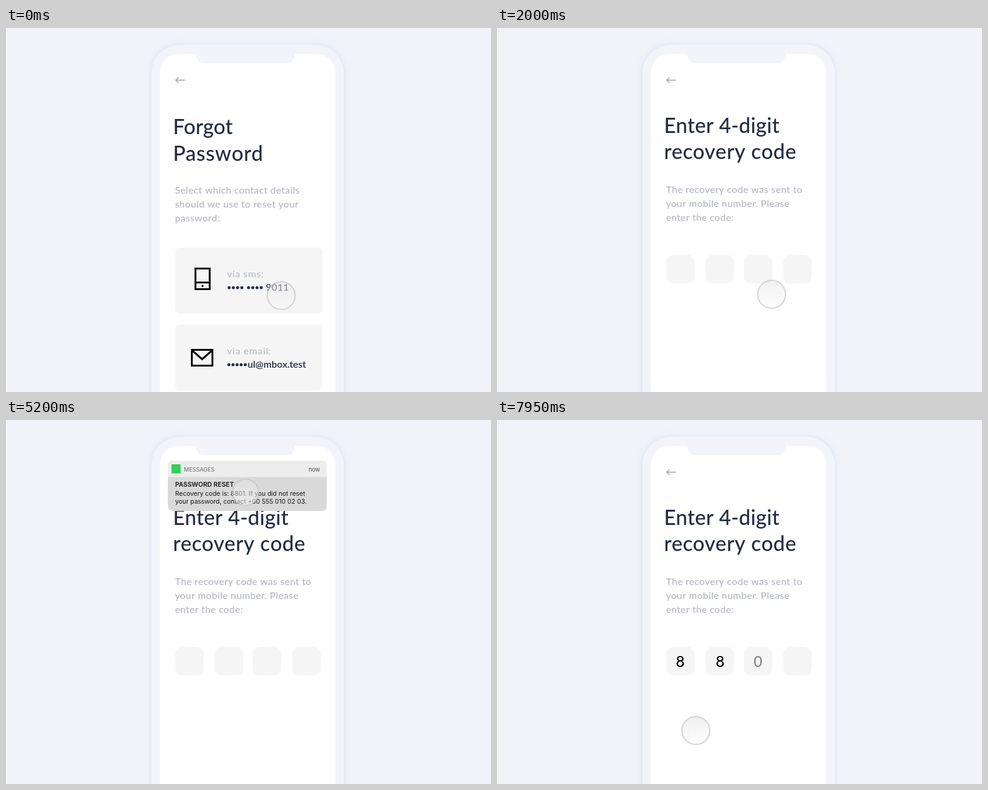
Write an HTML page with a canvas that moves like this. It is 800x600 px and loops after 8000 ms.

```html
<!DOCTYPE html>
<html lang="en">
<head>
<meta charset="utf-8">
<title>Password recovery</title>
<style>
  html, body { margin: 0; width: 100%; height: 100%; overflow: hidden; background: #f1f3f8; }
  canvas { display: block; }
</style>
</head>
<body>
<canvas id="stage" width="800" height="600"></canvas>
<script>
const ctx = document.getElementById('stage').getContext('2d');
const LOOP = 8000, STEP = 50;
const LATO = 'Lato, sans-serif', INTER = 'Inter, sans-serif';
const INK = '#232c42', MUTED = '#b3b6c1', SHELL = '#f3f4fa', TILE = '#f5f5f5';
const REST = [454, 441], IDLE = [453, 439], BANNER = [395, 119], FIELD = [318, 388], KEYS = [328, 512];

const ramp = (t, a, b) => Math.min(1, Math.max(0, (t - a) / (b - a)));
const smooth = u => u * u * (3 - 2 * u);
const mix = (p, q, u) => p.map((v, i) => v + (q[i] - v) * u);

function box(x, y, w, h, r, fill) {
  ctx.beginPath();
  ctx.roundRect(x, y, w, h, r);
  ctx.fillStyle = fill;
  ctx.fill();
}

function text(str, x, y, font, color, spacing = 0, align = 'left') {
  ctx.font = font;
  ctx.fillStyle = color;
  ctx.letterSpacing = spacing + 'px';
  ctx.textAlign = align;
  ctx.fillText(str, x, y);
}

function line(points, width, color) {
  ctx.beginPath();
  points.forEach(([x, y]) => ctx.lineTo(x, y));
  ctx.lineWidth = width;
  ctx.strokeStyle = color;
  ctx.stroke();
}

function disc(x, y, r, fill) {
  ctx.beginPath();
  ctx.arc(x, y, r, 0, Math.PI * 2);
  ctx.fillStyle = fill;
  ctx.fill();
}

function layer(alpha, dx, dy, draw) {
  if (alpha <= 0) return;
  ctx.save();
  ctx.globalAlpha = alpha;
  ctx.translate(dx, dy);
  draw();
  ctx.restore();
}

const title = (str, y, spacing) => text(str, 275.5, y, `500 34px ${LATO}`, INK, spacing);
const note = (lines, y) =>
  lines.forEach((s, i) => text(s, 278.7, y + i * 23, `500 16px ${LATO}`, MUTED, 0.36));

function dots(x, y, n, gap) {
  for (let i = 0; i < n; i++) disc(x + i * gap, y, 2.5, INK);
}

function phone() {
  ctx.fillStyle = '#f1f3f8';
  ctx.fillRect(0, 0, 800, 600);
  ctx.fillStyle = '#fafbfd';
  ctx.fillRect(0, 0, 1, 600);
  ctx.save();
  ctx.shadowColor = 'rgba(176, 196, 226, 0.42)';
  ctx.shadowBlur = 12;
  box(240, 28, 317, 700, 46, SHELL);
  ctx.restore();
  box(254, 43, 289, 700, 30, '#fff');
  box(314, 42, 162, 16, [0, 0, 13, 13], SHELL);
  const grey = '#a6a8b2';
  line([[280, 86], [295, 86]], 1.6, grey);
  line([[284.5, 81.5], [280, 86], [284.5, 90.5]], 1.6, grey);
}

function choicePage() {
  title('Forgot', 175, 0.1);
  title('Password', 218.5, 0.7);
  note(['Select which contact details', 'should we use to reset your', 'password:'], 272.5);

  box(279, 362, 243, 109, 8, TILE);
  box(279, 489, 242, 109, 8, TILE);
  const label = `500 16px ${LATO}`;
  text('via sms:', 364.5, 411, label, '#b9bbc4', 0.7);
  text('via email:', 364.5, 538, label, '#b9bbc4', 0.8);
  dots(368, 428, 4, 7);
  dots(400, 428, 4, 7);
  text('9011', 428.5, 433, label, INK, 0.3);
  dots(367.7, 555, 5, 6.7);
  text('ul@mbox.test', 398.5, 560, `600 16px ${LATO}`, INK);

  ctx.lineWidth = 3;
  ctx.strokeStyle = '#000';
  ctx.strokeRect(312.5, 396.5, 23.5, 34);
  line([[312, 419.5], [336, 419.5]], 3, '#000');
  disc(324.2, 425.3, 1.7, '#000');
  ctx.strokeRect(306.5, 530.5, 34, 26);
  line([[307, 531.5], [323.5, 546], [340, 531.5]], 3, '#000');
}

function codePage(t) {
  title('Enter 4-digit', 173, 0.25);
  title('recovery code', 216, 0.6);
  note(['The recovery code was sent to', 'your mobile number. Please', 'enter the code:'], 271.5);
  [279, 344, 407, 472].forEach(x => box(x, 374, 47, 47, 12, TILE));
  [...'880'].forEach((digit, i) => {
    const start = 7350 + i * 250;
    layer(ramp(t, start, start + 220), 0, 0, () =>
      text(digit, [302.3, 368, 430.5][i], 407, `500 25px ${LATO}`, '#000', 0, 'center'));
  });
}

function banner() {
  box(267, 67, 262, 83, 8, '#d9d9d9');
  box(267, 67, 262, 27, [8, 8, 0, 0], '#ededed');
  ctx.fillStyle = '#2fd158';
  ctx.fillRect(273, 73, 15, 15);
  text('MESSAGES', 293.5, 84.5, `400 9.3px ${INTER}`, '#6c6c6c');
  text('now', 518, 84.5, `400 9.5px ${INTER}`, '#4a4a4a', 0, 'right');
  text('PASSWORD RESET', 279, 110, `600 10.6px ${INTER}`, '#161616');
  text('Recovery code is: 8801. If you did not reset', 279, 124.5, `400 10.5px ${INTER}`, '#161616');
  text('your password, contact +00 555 010 02 03.', 279, 137.5, `400 10.5px ${INTER}`, '#161616');
}

function pointerAt(t) {
  if (t < 3670) return mix(REST, IDLE, ramp(t, 0, 100));
  if (t < 5300) return mix(IDLE, BANNER, smooth(ramp(t, 3670, 4650)));
  if (t < 7250) return mix(BANNER, FIELD, smooth(ramp(t, 5300, 6700) ** 0.55));
  const u = smooth(ramp(t, 7250, 7960)), bend = [305, 450];
  return mix(mix(FIELD, bend, u), mix(bend, KEYS, u), u);
}

function pointer(t) {
  const [x, y] = pointerAt(t);
  const pressed = [[600, 650], [5200, 5350], [7000, 7150]].some(([a, b]) => t >= a && t < b);
  const r = pressed ? 21.5 : 23;
  const fill = ctx.createLinearGradient(0, y - r, 0, y + r);
  fill.addColorStop(0, 'rgba(226, 226, 226, 0.5)');
  fill.addColorStop(1, 'rgba(252, 252, 252, 0.5)');
  disc(x, y, r, fill);
  ctx.lineWidth = 2.2;
  ctx.strokeStyle = 'rgba(196, 196, 196, 0.65)';
  ctx.stroke();
}

function draw(t) {
  phone();
  const leave = ramp(t, 750, 1050);
  layer(1 - leave * 1.25, leave * 2, leave * 26, choicePage);
  const enter = ramp(t, 1400, 1750);
  layer(enter, 0, 12 * (1 - enter) ** 2, () => codePage(t));
  layer(ramp(t, 2800, 3150) - ramp(t, 5300, 5650), 0, 0, banner);
  pointer(t);
}

const began = performance.now();
function tick() {
  const t = (performance.now() - began) % LOOP;
  draw(Math.floor(t / STEP) * STEP);
  requestAnimationFrame(tick);
}
tick();
</script>
</body>
</html>
```
